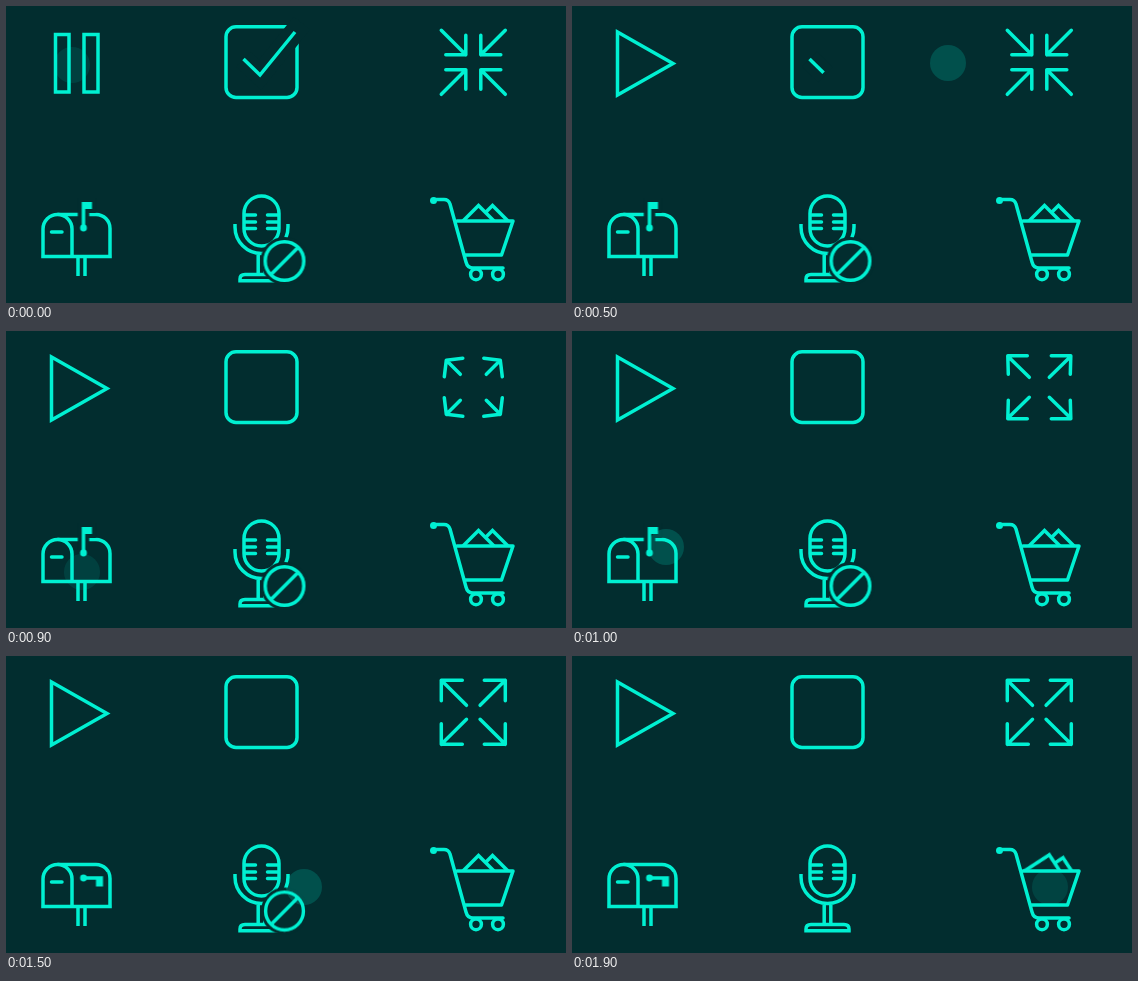
Recreate the animation shown at these times as an HTML page. Size 560 by 297 pixels, loop 2 s.

```html
<!DOCTYPE html>
<html lang="en">
<head>
<meta charset="utf-8">
<title>Icon states</title>
<style>
  :root { --bg: #022d2f; --line: #00f0d2; }
  html, body { margin: 0; width: 100%; height: 100%; overflow: hidden; background: var(--bg); }
  svg { display: block; width: 100%; height: 100%; fill: none; stroke: var(--line); stroke-width: 3.5; }
  .round { stroke-linecap: round; stroke-linejoin: round; }
  .solid { fill: var(--line); stroke: none; }
  .halo { stroke: var(--bg); }
  .halo.disc { fill: var(--bg); stroke: none; }
  .anim { animation: 2s linear infinite; }

  .bars { animation-name: bars; }
  @keyframes bars {
    0% { d: path("M49.5 28.5 63 28.5 63 86 49.5 86Z M78 28.5 92 28.5 92 86 78 86Z"); }
    5% { d: path("M48.6 28 64 31 64 83.5 48.6 86.7Z M75.6 31 93.8 35 93.8 79.5 75.6 83.5Z"); }
    10% { d: path("M47 27.2 66 35.3 66 79.7 47 87.6Z M71 35.3 97 47 97 68 71 79.7Z"); }
    14.9%, 100% { d: path("M45.5 26 69 39 69 76 45.5 89Z M69 39 101 56 101 59 69 76Z"); }
  }
  .bars-show { animation-name: hide; animation-timing-function: step-end; }
  .play { animation-name: show; animation-timing-function: step-end; }
  @keyframes hide { 0% { opacity: 1; } 15%, 100% { opacity: 0; } }
  @keyframes show { 0% { opacity: 0; } 15%, 100% { opacity: 1; } }

  .check { stroke-dasharray: 1 2; animation-name: uncheck; }
  @keyframes uncheck {
    0%, 15% { stroke-dashoffset: 0; }
    20% { stroke-dashoffset: .3; }
    25% { stroke-dashoffset: .75; }
    30%, 100% { stroke-dashoffset: 1; }
  }

  .arrow { animation-name: expand; }
  @keyframes expand {
    0%, 30% { d: path("M-32 -32 L-7.5 -7.5 M-7.5 -27 L-7.5 -7.5 L-27.5 -7.5"); }
    35% { d: path("M-30 -30.5 L-7.5 -7.5 M-7.5 -27 L-7.5 -7.5 L-27.5 -7.5"); }
    40% { d: path("M-23 -23 L-10 -10 M-8.5 -27 L-12 -12 L-27.5 -8.5"); }
    45% { d: path("M-27 -27 L-13 -13 M-10.5 -29 L-27 -27 L-29 -10.5"); }
    50% { d: path("M-31.5 -31 L-10 -10 M-12 -31.5 L-31.5 -31.5 L-31 -13"); }
    55%, 100% { d: path("M-32 -32 L-6.8 -7 M-11 -32 L-32 -32 L-32 -11.5"); }
  }

  .flag { animation-name: lower; }
  @keyframes lower {
    0%, 55% { transform: rotate(0deg); }
    60% { transform: rotate(10deg); }
    65% { transform: rotate(33deg); }
    70% { transform: rotate(72deg); }
    75%, 100% { transform: rotate(90deg); }
  }
  .pole { animation-name: shorten; }
  @keyframes shorten {
    0%, 65% { d: path("M-1.75 0 L-1.75 -26 L8.5 -26 L8.5 -19 L1.75 -19 L1.75 0Z"); }
    75%, 100% { d: path("M-1.75 0 L-1.75 -19.5 L8.5 -19.5 L8.5 -12.5 L1.75 -12.5 L1.75 0Z"); }
  }

  .badge { animation-name: unmute; }
  @keyframes unmute {
    0%, 70% { transform: scale(1); }
    75% { transform: scale(.98); }
    80% { transform: scale(.8); }
    85% { transform: scale(.35); }
    90%, 100% { transform: scale(0); }
  }

  .goods { transform-origin: 478px 222px; animation-name: tilt; }
  @keyframes tilt {
    0%, 90% { transform: rotate(0deg); }
    95%, 100% { transform: rotate(12deg); }
  }

  .touch { opacity: .18; animation-name: touch; }
  @keyframes touch {
    0% { transform: translate(66px, 59px); opacity: .1; }
    5% { transform: translate(130px, 58px); opacity: .18; }
    10% { transform: translate(220px, 58px); }
    15% { transform: translate(255px, 57px); }
    20% { transform: translate(292px, 57px); }
    25% { transform: translate(376px, 57px); }
    30% { transform: translate(456px, 57px); opacity: .18; }
    35% { transform: translate(467px, 57px); opacity: .1; }
    40% { transform: translate(467px, 57px); opacity: 0; }
    40.1% { transform: translate(76px, 241px); opacity: 0; }
    45% { transform: translate(76px, 241px); opacity: .1; }
    50% { transform: translate(94px, 216px); opacity: .18; }
    55% { transform: translate(122px, 214px); }
    60% { transform: translate(172px, 225px); }
    65% { transform: translate(228px, 231px); }
    70% { transform: translate(262px, 231px); }
    75% { transform: translate(298px, 231px); }
    80% { transform: translate(372px, 231px); }
    85% { transform: translate(446px, 231px); }
    90% { transform: translate(478px, 231px); opacity: .18; }
    95%, 100% { transform: translate(478px, 231px); opacity: .11; }
  }
</style>
</head>
<body>
<svg viewBox="0 0 560 297" preserveAspectRatio="none">
  <clipPath id="above-basket"><path d="M440 180H520V215H440Z"/></clipPath>

  <!-- pause / play -->
  <g class="anim bars-show"><path class="anim bars"/></g>
  <path class="anim play" d="M45.5 26 101 57.5 45.5 89Z"/>

  <!-- checkbox -->
  <rect x="220" y="20.8" width="71" height="70.6" rx="10"/>
  <path class="anim check halo" pathLength="1" stroke-width="21" style="stroke-width:21" d="M237.5 53 254 69 296 17"/>
  <path class="anim check" pathLength="1" d="M237.5 53 254 69 289 26"/>

  <!-- collapse / expand -->
  <g class="round" transform="translate(467.3 56.3)">
    <path class="anim arrow"/>
    <g transform="scale(-1 1)"><path class="anim arrow"/></g>
    <g transform="scale(1 -1)"><path class="anim arrow"/></g>
    <g transform="scale(-1 -1)"><path class="anim arrow"/></g>
  </g>

  <!-- mailbox -->
  <path d="M37 250.5V223A14.5 14.5 0 0 1 66 223V250.5M51.5 208.5H90A14 14 0 0 1 104 222.5V250.5M35.2 250.5H105.8M72 250V270M79 250V270"/>
  <path class="round" d="M45.5 226H56"/>
  <g transform="translate(77.5 222)">
    <g class="anim flag">
      <path class="anim pole halo" style="stroke-width:8"/>
      <path class="anim pole solid"/>
    </g>
    <circle class="solid" r="3.4"/>
  </g>

  <!-- microphone -->
  <rect x="238" y="190" width="35" height="50" rx="17.5"/>
  <path class="round" d="M239 209H249.5M239 216H249.5M239 222.5H249.5M261.5 209H272M261.5 216H272M261.5 222.5H272"/>
  <path d="M229 218V221A26.5 26.5 0 0 0 282 221V218M252.2 248V268M258.8 248V268M234 274.7V273Q234 268.6 239 268.6H272Q277 268.6 277 273V274.7Z"/>
  <g transform="translate(278.5 255)">
    <g class="anim badge">
      <circle class="halo disc" r="24"/>
      <circle r="19.3"/>
      <path d="M-13.5 13.5 13.5 -13.5"/>
    </g>
  </g>

  <!-- cart -->
  <g clip-path="url(#above-basket)">
    <path class="anim goods" d="M450 222 472.5 199.5 496 223M478.5 207.5 486.5 199.5 510 223"/>
  </g>
  <circle class="solid" cx="427.5" cy="194.5" r="3.5"/>
  <path class="round" d="M427.5 193.5H438Q442.5 193.5 444 198L460 256Q461.5 262 467 262H497M451 215H507L495.5 249H459"/>
  <circle class="halo disc" cx="470" cy="268.3" r="6"/>
  <circle class="halo disc" cx="492" cy="268.3" r="6"/>
  <circle cx="470" cy="268.3" r="5.4"/>
  <circle cx="492" cy="268.3" r="5.4"/>

  <circle class="anim touch solid" r="18"/>
</svg>
<script>
  // Hold each pose for 100 ms.
  const STEP = 100, LOOP = 2000;
  const animations = document.getAnimations();
  animations.forEach(a => a.pause());

  function render() {
    const time = Math.floor((performance.now() + 0.5) / STEP) * STEP % LOOP;
    animations.forEach(a => { a.currentTime = time; });
    requestAnimationFrame(render);
  }
  render();
</script>
</body>
</html>
```
